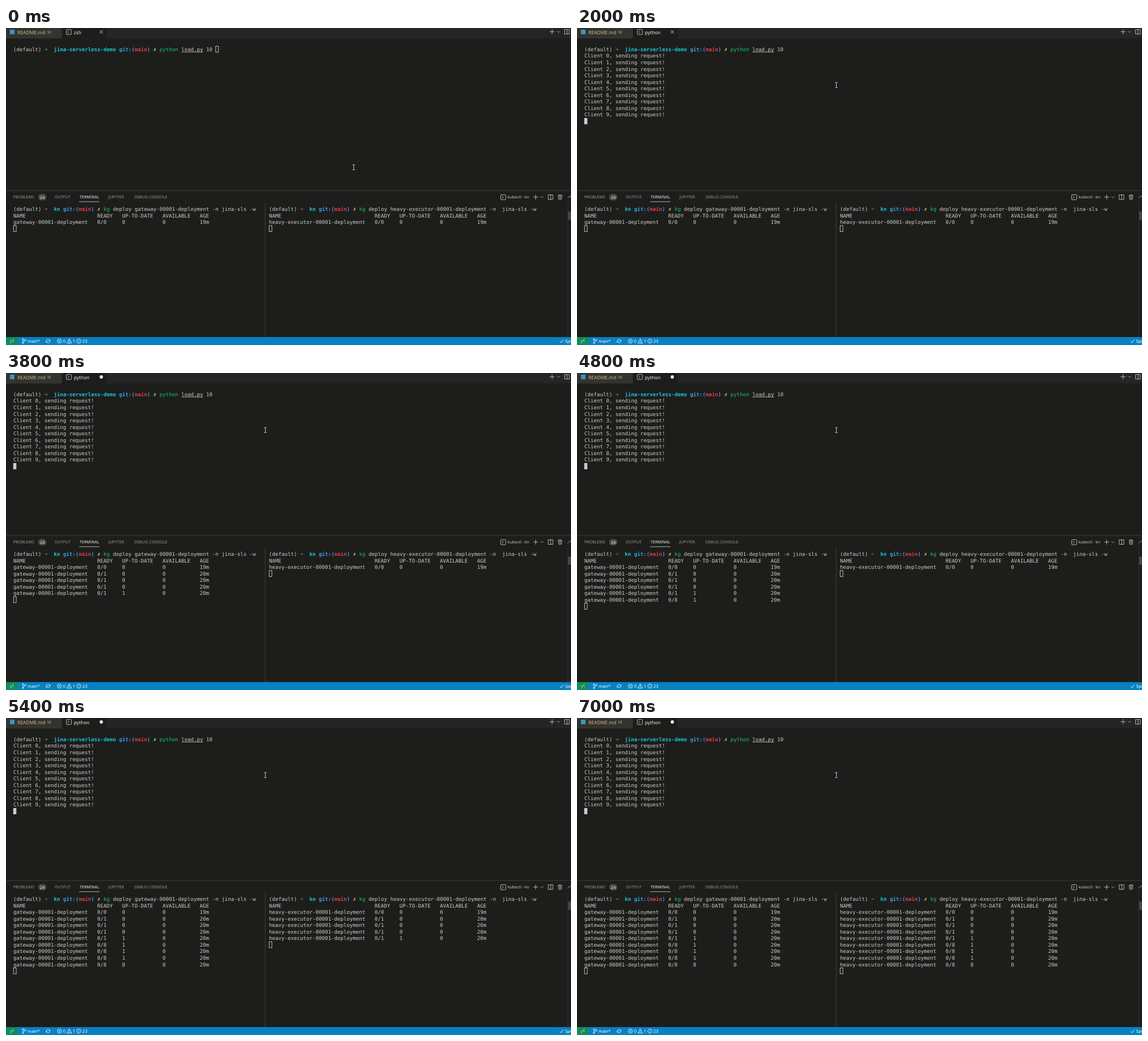
These frames come from a looping animation (999x560 px, 8000 ms). An HTML page:

```html
<!DOCTYPE html>
<html lang="en">
<head>
<meta charset="utf-8">
<title>Terminal session</title>
<style>
  html, body { margin: 0; width: 100%; height: 100%; overflow: hidden; background: #1d1e1b; }
  svg { display: block; width: 999px; height: 560px; }
  text { white-space: pre; text-rendering: geometricPrecision; }
  .mono { font: 9.136px "DejaVu Sans Mono", monospace; fill: #cccccc; }
  .ui { font-family: "Noto Sans", "Open Sans", sans-serif; }
  .bold { font-weight: bold; }
  .line { fill: none; stroke-linecap: round; stroke-linejoin: round; }
</style>
</head>
<body>
<svg id="stage" viewBox="0 0 999 560" xmlns="http://www.w3.org/2000/svg"></svg>
<script>
const LOOP = 8000, CHAR = 5.5, ROW = 11.55;
const C = {
  text: '#cccccc', green: '#12c27d', cyan: '#1ac4d8', blue: '#3a9ae8',
  red: '#e5364f', yellow: '#e6e354', border: '#424340', icon: '#c5c5c5'
};
const stage = document.getElementById('stage');
const timed = [];

function add(tag, attrs, content) {
  const el = document.createElementNS('http://www.w3.org/2000/svg', tag);
  for (const k in attrs) el.setAttribute(k, attrs[k]);
  if (content !== undefined) el.textContent = content;
  stage.appendChild(el);
  return el;
}
const rect = (x, y, width, height, fill, more) => add('rect', { x, y, width, height, fill, ...more });
const path = (d, stroke = C.icon, width = 0.9) =>
  add('path', { d, stroke, 'stroke-width': width, class: 'line' });
const ui = (x, y, str, size, fill) =>
  add('text', { x, y, class: 'ui', 'font-size': size, fill }, str);

// Show an element only inside [from, to)
function during(el, from, to = LOOP) {
  timed.push({ el, from, to });
  return el;
}

// A terminal addresses text by column and row
function terminal(x0, base) {
  const x = col => x0 + col * CHAR, y = row => base + row * ROW;
  return {
    print: (col, row, str, fill = C.text, bold) => add('text',
      { x: x(col), y: y(row), class: bold ? 'mono bold' : 'mono', style: `fill:${fill}` }, str),
    caret: (col, row, solid) => solid
      ? rect(x(col) - 0.2, y(row) - 8.9, 5.5, 11, C.text)
      : rect(x(col) + 0.3, y(row) - 8.7, 4.8, 10.6, 'none', { stroke: C.text, 'stroke-width': 0.9 }),
    rule: (col, row, n) => rect(x(col), y(row) + 1.2, n * CHAR, 0.8, C.text)
  };
}

function prompt(term, dir, arrow) {
  let col = 13;
  term.print(0, 0, '(default)');
  term.print(10, 0, '➜', arrow, true);
  const parts = [[dir + ' ', C.cyan], ['git:(', C.blue], ['main', C.red], [') ', C.blue], ['✗', C.yellow]];
  for (const [str, fill] of parts) {
    term.print(col, 0, str, fill, true);
    col += str.length;
  }
  return col + 1;
}

function plus(x, y) { path(`M${x - 4} ${y}h8M${x} ${y - 4}v8`); }
function chevron(x, y) { path(`M${x - 2.3} ${y - 1.1}l2.3 2.3l2.3 -2.3`, C.icon, 0.8); }
function split(x, y) { path(`M${x} ${y}h8v8h-8zM${x + 4} ${y}v8`); }
function shell(x, y) {
  rect(x, y, 9, 9, 'none', { rx: 1.2, stroke: C.icon, 'stroke-width': 0.9 });
  path(`M${x + 2.5} ${y + 2.3}l2.3 2.3l-2.3 2.3`);
}

function tabs() {
  rect(0, 0, 999, 18.5, '#242524');
  rect(0, 0, 98.5, 18.5, '#33342f');
  rect(99, 0, 78.5, 18.5, '#1d1e1b');
  rect(7, 3, 8, 8, '#3f94be');
  ui(20, 10.6, 'README.md', 8.5, '#d3b58a');
  ui(73, 10.2, 'M', 7.6, '#b39b78');
  shell(106.7, 2.6);
  during(ui(120, 10.6, 'zsh', 8.4, '#f0f0f0'), 0, 1900);
  during(ui(120, 10.6, 'python', 8.4, '#f0f0f0'), 1900);
  during(path('M165.8 4.2l5.4 5.4M171.2 4.2l-5.4 5.4', '#e4e4e4'), 0, 3800);
  during(add('circle', { cx: 168.5, cy: 7, r: 2.9, fill: '#eeeeee' }), 3800);
  plus(965.6, 6.6);
  chevron(976.8, 6.8);
  split(988, 2.7);
}

function panel() {
  rect(0, 286.6, 999, 0.9, C.border);
  const labels = [[13, 'PROBLEMS'], [86, 'OUTPUT'], [130, 'TERMINAL'], [181, 'JUPYTER'], [227, 'DEBUG CONSOLE']];
  for (const [x, str] of labels) ui(x, 301.4, str, 7.1, str === 'TERMINAL' ? '#eeeeee' : '#979793');
  rect(129.3, 306.5, 36, 0.8, '#d8d8d8');
  rect(57, 293.2, 14.4, 11.4, '#4b4c49', { rx: 5.7 });
  ui(60.1, 301.6, '24', 7.1, '#f2f2f2');
  shell(874.6, 294.4);
  ui(887, 301.4, 'kubectl - kn', 7, C.text);
  plus(936.6, 298.7);
  chevron(947.6, 298.8);
  split(959, 294.7);
  path('M975.8 296h7.6M978.3 296v-1.4h2.6v1.4M976.7 296l.4 6.7h5l.4 -6.7M978.7 298v3M980.5 298v3', C.icon, 0.8);
  path('M993.5 300.3l3.7 -3.7l3.7 3.7');
  rect(457.8, 309.5, 0.9, 236.5, C.border);
  rect(993, 309.5, 0.8, 236.5, '#343532');
  rect(994, 324.3, 5, 14.5, '#474845');
}

function statusBar() {
  const white = '#ffffff';
  rect(0, 546, 999, 14, '#0880c2');
  rect(0, 546, 20.6, 14, '#118b5c');
  path('M7.3 552.2l2.5 2.3l-2.5 2.3M13.4 549.6l-2.5 2.3l2.5 2.3', white, 0.8);
  path('M30 551.2v4.3M34 552.4c0 2 -4 1.2 -4 2.8', white, 0.8);
  for (const [cx, cy] of [[30, 550], [30, 556.6], [34, 551.2]])
    add('circle', { cx, cy, r: 1.2, fill: 'none', stroke: white, 'stroke-width': 0.8 });
  ui(38, 555.9, 'main*', 7.4, white);
  path('M71.3 552.6a3.2 3.2 0 0 1 6.1 -.6M77.5 553.6a3.2 3.2 0 0 1 -6.1 .6M76 552.4l1.6 .3l.7 -1.4M72.8 553.8l-1.6 -.3l-.8 1.4', white, 0.8);
  for (const cx of [94.4, 128.9])
    add('circle', { cx, cy: 553.1, r: 3.7, fill: 'none', stroke: white, 'stroke-width': 0.8 });
  path('M93 551.7l2.8 2.8M95.8 551.7l-2.8 2.8M128.9 552.8v2M128.9 551.2v.1', white, 0.8);
  path('M112 549.3l3.9 7.3h-7.8zM112 552v2M112 555.3v.1', white, 0.8);
  ui(100.8, 555.9, '0', 7.7, white);
  ui(118.1, 555.9, '1', 7.7, white);
  ui(135, 555.9, '23', 7.7, white);
  path('M979.4 553.8l2 2.2l4 -5.2', white, 0.9);
  ui(988.5, 555.9, 'Spell', 7.6, white);
}

function loadTest() {
  const term = terminal(13, 40.9);
  const col = prompt(term, 'jina-serverless-demo', C.green);
  term.print(col, 0, 'python', C.green);
  term.print(col + 7, 0, 'load.py');
  term.rule(col + 7, 0, 7);
  term.print(col + 15, 0, '10');
  during(term.caret(col + 18, 0, false), 0, 700);
  during(term.caret(col + 18, 0, true), 700, 1800);
  during(term.caret(0, 1, true), 1800, 2000);
  for (let i = 0; i < 10; i++) during(term.print(0, i + 1, `Client ${i}, sending request!`), 2000);
  during(term.caret(0, 11, true), 2000);
}

// times: when each row of the watch output appears
function watch(x, name, nameWidth, flags, times) {
  const term = terminal(x, 323);
  const line = (a, b, c, d, e) => a.padEnd(nameWidth) + b.padEnd(8) + c.padEnd(13) + d.padEnd(12) + e;
  const col = prompt(term, 'kn', C.red);
  term.print(col, 0, 'kg', C.green);
  term.print(col + 3, 0, `deploy ${name} ${flags}`);
  term.print(0, 1, line('NAME', 'READY', 'UP-TO-DATE', 'AVAILABLE', 'AGE'));
  const states = ['0/0 0', '0/1 0', '0/1 0', '0/1 0', '0/1 1', '0/8 1', '0/8 1', '0/8 1', '0/8 8'];
  states.forEach((state, i) => {
    const [ready, current] = state.split(' ');
    const row = line(name, ready, current, '0', i ? '20m' : '19m');
    during(term.print(0, i + 2, row), times[i]);
    during(term.caret(0, i + 3, false), times[i], times[i + 1]);
  });
}

tabs();
panel();
statusBar();
loadTest();
watch(13, 'gateway-00001-deployment', 27, '-n jina-sls -w',
  [0, 2700, 2800, 2800, 2800, 4800, 4900, 4900, 5000]);
watch(465, 'heavy-executor-00001-deployment', 34, '-n  jina-sls -w',
  [0, 5300, 5400, 5400, 5400, 6800, 6900, 6900, 7000]);

const beam = 'M-1.9 -4.5h1.3l.6 .6l.6 -.6h1.3M0 -3.9v7.8M-1.9 4.5h1.3l.6 -.6l.6 .6h1.3';
const pointer = [path(beam, '#0c0c0b', 2), path(beam, '#f4f4f4', 0.9)];
const stops = [[0, 614.8, 246], [400, 491.3, 168], [600, 458.6, 100.8]];

function draw(t) {
  for (const { el, from, to } of timed)
    el.setAttribute('visibility', t >= from && t < to ? 'visible' : 'hidden');
  const [, x, y] = stops.filter(s => t >= s[0]).pop();
  for (const p of pointer) p.setAttribute('transform', `translate(${x} ${y})`);
}

const start = performance.now();
function tick() {
  draw((performance.now() - start) % LOOP);
  requestAnimationFrame(tick);
}
tick();
</script>
</body>
</html>
```
